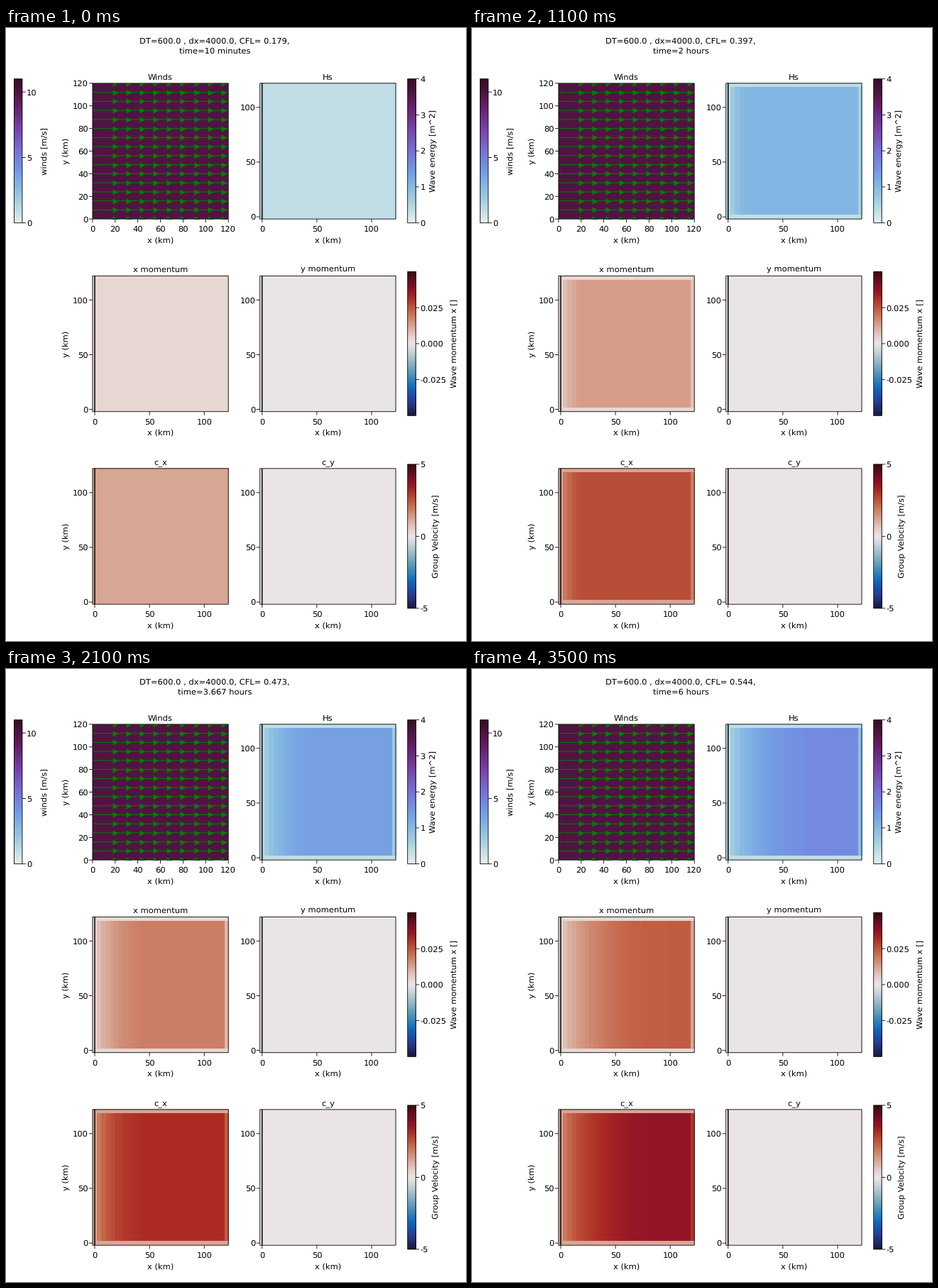
Recreate the animation shown at these times as a matplotlib script. Size 648 px wide and 864 px high, loop 3.6 s.

```python
import numpy as np
import matplotlib.pyplot as plt
from matplotlib.animation import FuncAnimation
from matplotlib.colors import LinearSegmentedColormap, Normalize
from matplotlib.patches import Rectangle

W, H, DPI = 648, 864, 100
STEPS, STEP_MIN = 36, 10
PX = 72 / DPI                       # points per pixel
SIDE = 191.3                        # panel size in pixels
LINE = 0.85
LEFTS, TOPS = (121.9, 357.7), (77.9, 349.4, 620.9)

plt.rcParams.update({"font.family": "DejaVu Sans", "font.size": 11.5 * PX,
                     "text.hinting": "none"})


def make_cmap(name, hexes, extra=()):
    stops = list(zip(np.linspace(0, 1, len(hexes)), hexes))
    return LinearSegmentedColormap.from_list(name, sorted([*stops, *extra]), N=256)


DENSE = make_cmap("dense_like", [
    "#e6f0f0", "#bfdde5", "#9cc9e2", "#81b4e3", "#739ae4", "#757fdd",
    "#7864ca", "#774aaf", "#71328d", "#641f68", "#501442", "#360e24"])
BALANCE = make_cmap("balance_like", [
    "#171c42", "#293a8f", "#0b66bd", "#4590b9", "#8eb5c2", "#d2d8db",
    "#e6d2cc", "#d59d89", "#c46548", "#ac2b24", "#780e28", "#3c0911"],
    [(0.5, "#ebe6e6"), (9.5 / 11, "#931427")])

fig = plt.figure(figsize=(W / DPI, H / DPI), dpi=DPI, facecolor="white")
ax = fig.add_axes([0, 0, 1, 1])
ax.axis("off")


def line(xs, ys, color="black", width=LINE, **kw):
    return ax.plot(xs, ys, color=color, lw=width * PX, solid_capstyle="butt",
                   snap=False, **kw)[0]


def label(x, y, s, ha="center"):
    return ax.text(x, y, s, ha=ha, va="baseline")


def side_label(x, y, s):
    ax.text(x, y, s, rotation=90, ha="center", va="center")


def frame_box(x, y, w, h):
    ax.add_patch(Rectangle((x, y), w, h, fill=False, ec="black", lw=LINE * PX,
                           snap=False, zorder=5))


def panel(col, row, title, lo, hi, xticks, yticks):
    """Draw the frame, ticks and labels; return the data-to-pixel mappings."""
    x0, y0 = LEFTS[col], TOPS[row]
    y1, scale = y0 + SIDE, SIDE / (hi - lo)
    to_x = lambda v: x0 + (v - lo) * scale
    to_y = lambda v: y1 - (v - lo) * scale
    frame_box(x0, y0, SIDE, SIDE)
    for v in xticks:
        line([to_x(v)] * 2, [y1, y1 + 5])
        label(to_x(v), y1 + 18, str(v))
    for v in yticks:
        line([x0 - 5, x0], [to_y(v)] * 2)
        label(x0 - 6, to_y(v) + 4.2, str(v), "right")
    label(x0 + SIDE / 2, y0 - 5.5, title)
    label(x0 + SIDE / 2, y1 + 33, "x (km)")
    if col == 0:
        side_label(84.5, y0 + SIDE / 2, "y (km)")
    return to_x, to_y


def heatmap(col, row, title, cmap, vmin, vmax):
    to_x, _ = panel(col, row, title, -2, 122, (0, 50, 100), (0, 50, 100))
    x0, y0 = LEFTS[col], TOPS[row]
    line([to_x(0)] * 2, [y0, y0 + SIDE], width=1.5, zorder=4)
    return ax.imshow(np.zeros((31, 31)), cmap=cmap, norm=Normalize(vmin, vmax),
                     extent=(x0, x0 + SIDE, y0 + SIDE, y0),
                     interpolation="nearest", aspect="auto", zorder=1)


def colorbar(x, y, cmap, lo, hi, ticks, fmt, text, text_x):
    w, h = 11.5, 203
    ax.imshow(np.linspace(1, 0, 256)[:, None], cmap=cmap, vmin=0, vmax=1,
              extent=(x, x + w, y + h, y), aspect="auto", zorder=1)
    frame_box(x, y, w, h)
    for v in ticks:
        ty = y + h * (hi - v) / (hi - lo)
        line([x + w, x + w + 5], [ty, ty])
        label(x + w + 6.3, ty + 4.2, format(v, fmt), "left")
    side_label(text_x, y + h / 2, text)


def winds():
    ticks = range(0, 121, 20)
    to_x, to_y = panel(0, 0, "Winds", 0, 120, ticks, ticks)
    box = Rectangle((LEFTS[0], TOPS[0]), SIDE, SIDE, fc=DENSE(10 / 11), ec="none", zorder=1)
    ax.add_patch(box)
    heads = np.array([to_x(v) for v in range(20, 120, 12)])
    for v in range(0, 121, 8):
        y = to_y(v)
        parts = [line([to_x(0), to_x(120)], [y, y], "green", 1.0, zorder=2)]
        parts += ax.plot(heads, np.full(len(heads), y), ls="none", marker=">",
                         ms=7.3 * PX, mfc="green", mec="none", snap=False, zorder=3)
        for p in parts:
            p.set_clip_path(box)


winds()
hs_map = heatmap(1, 0, "Hs", DENSE, 0, 4)
mx_map = heatmap(0, 1, "x momentum", BALANCE, -0.05, 0.05)
heatmap(1, 1, "y momentum", BALANCE, -0.05, 0.05)
cx_map = heatmap(0, 2, "c_x", BALANCE, -5, 5)
heatmap(1, 2, "c_y", BALANCE, -5, 5)

colorbar(11.4, 71.7, DENSE, 0, 11, (0, 5, 10), "d", "winds [m/s]", 55)
colorbar(565.7, 71.7, DENSE, 0, 4, range(5), "d", "Wave energy [m^2]", 602)
colorbar(565.7, 343.4, BALANCE, -0.05, 0.05, (-0.025, 0.0, 0.025), ".3f",
         "Wave momentum x []", 631.5)
colorbar(565.7, 614.9, BALANCE, -5, 5, (-5, 0, 5), "d", "Group Velocity [m/s]", 606)

head = label(294, 22.2, "")
clock = label(294, 35.7, "")
ax.set(xlim=(0, W), ylim=(H, 0))

KNOTS = np.array([10, 60, 120, 190, 250, 300, 360])
CFL = np.array([0.179, 0.322, 0.397, 0.453, 0.491, 0.517, 0.544])
OUT_SPEED = [0, 0.1, 0.46, 0.52, 0.7, 0.72, 0.74]      # outflow column growth
OUT_WAVE = [0, 0.25, 0.35, 0.36, 0.38, 0.4, 0.42]
GRID_X = np.arange(1, 31) * 4.0


def cfl_at(t):
    return np.exp(np.interp(np.log(t), np.log(KNOTS), np.log(CFL)))


def wave_height(c):
    return 0.8 * (c / 2.147) ** 1.4


def momentum(c):
    return wave_height(c) ** 2 / (32 * c)


def field(quantity, speed, t, out):
    """Fixed rim, fetch-limited interior and a partly filled outflow column."""
    rim = quantity(CFL[0] / 0.15)
    z = np.full((31, 31), rim)
    row = quantity(speed)
    row[-1] = rim + np.interp(t, KNOTS, out) * (row[-1] - rim)
    z[1:-1, 1:] = row
    return z


def pretty_time(t):
    if t < 60:
        return f"{t} minutes"
    if t == 60:
        return "1 hour"
    return f"{t // 60} hours" if t % 60 == 0 else f"{t / 60:.3f} hours"


def update(i):
    t = (i + 1) * STEP_MIN
    cfl = cfl_at(t)
    fetch = 66 * (t / 360) ** 1.29
    growth = (GRID_X / fetch) ** 0.225
    speed = cfl / 0.15 * (1 + growth ** -30) ** (-1 / 30)
    hs_map.set_data(field(wave_height, speed, t, OUT_WAVE))
    mx_map.set_data(field(momentum, speed, t, OUT_WAVE))
    cx_map.set_data(field(np.copy, speed, t, OUT_SPEED))
    head.set_text(f"DT=600.0 , dx=4000.0, CFL= {cfl:.3f},")
    clock.set_text(f"time={pretty_time(t)}")
    return hs_map, mx_map, cx_map, head, clock


anim = FuncAnimation(fig, update, frames=STEPS, interval=100, repeat=True,
                     repeat_delay=0, blit=False)
plt.show()
```
